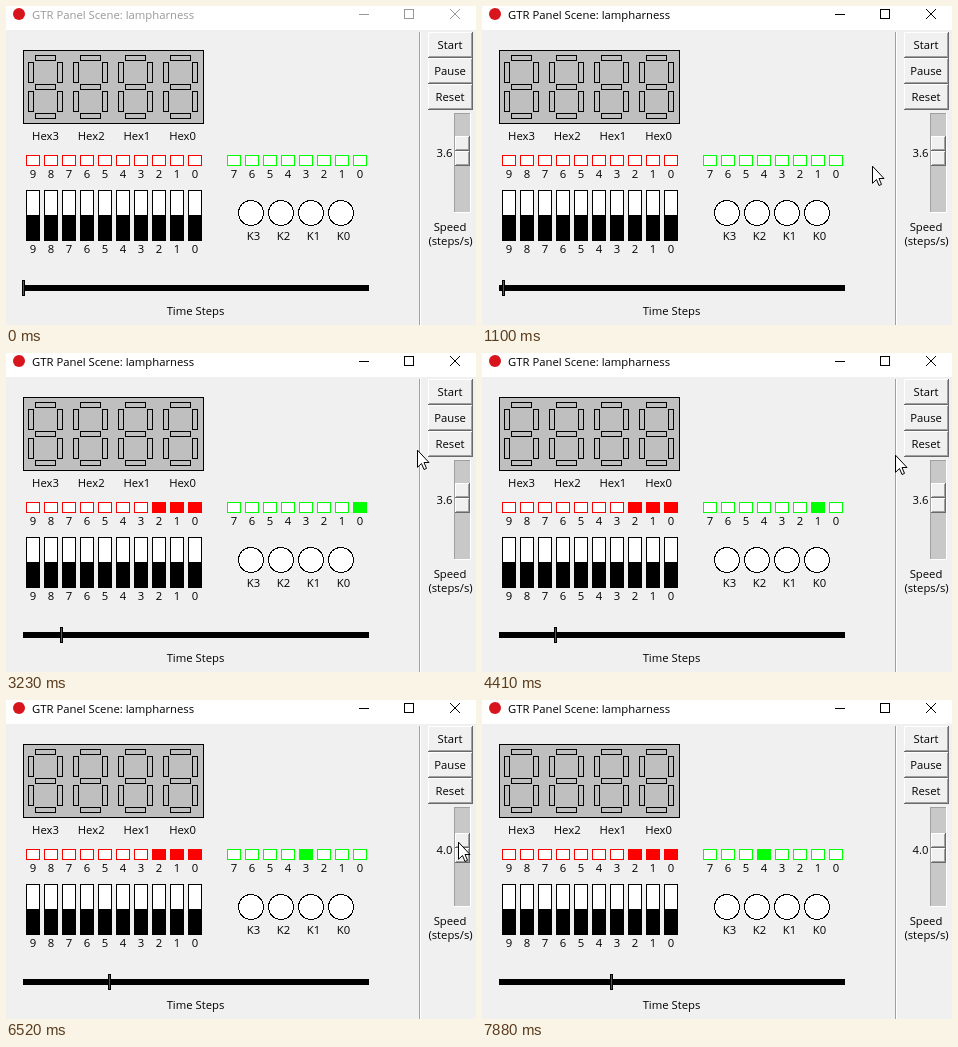
An HTML page for the animation above (8 s loop, 470x319 px).

```html
<!DOCTYPE html>
<html lang="en">
<head>
<meta charset="utf-8">
<title>GTR Panel Scene</title>
<style>
  html, body { margin: 0; width: 100%; height: 100%; overflow: hidden; background: #f0f0f0; }
  svg { display: block; width: 470px; height: 319px; }
  rect, path, .key { shape-rendering: crispEdges; }
  text { font: 11.3px "Open Sans", "Noto Sans", sans-serif; text-anchor: middle; }
  .smooth { shape-rendering: auto; }
</style>
</head>
<body>
<svg id="stage" viewBox="0 0 470 319"></svg>
<script>
const stage = document.getElementById('stage');

function add(tag, attrs, parent = stage) {
  const node = document.createElementNS('http://www.w3.org/2000/svg', tag);
  for (const key in attrs) node.setAttribute(key, attrs[key]);
  return parent.appendChild(node);
}
const fillBox = (x, y, width, height, fill, parent) =>
  add('rect', { x, y, width, height, fill }, parent);
// Outlined box covering exactly w by h pixels.
const outline = (x, y, w, h, fill, stroke = '#000') =>
  add('rect', { x: x + .5, y: y + .5, width: w - 1, height: h - 1, fill, stroke });
function label(str, x, y) {
  const node = add('text', { x, y });
  node.textContent = str;
  return node;
}
function bevel(x, y, w, h, parent) {
  const g = add('g', {}, parent);
  fillBox(x, y, w, h, '#696969', g);
  fillBox(x, y, w - 1, h - 1, '#fff', g);
  fillBox(x + 1, y + 1, w - 2, h - 2, '#a0a0a0', g);
  fillBox(x + 1, y + 1, w - 3, h - 3, '#f0f0f0', g);
  return g;
}

// Title bar
fillBox(0, 0, 470, 24, '#fff');
add('circle', { cx: 13, cy: 8, r: 6, fill: '#d8141c' });
const title = label('GTR Panel Scene: lampharness', 26, 13);
title.style.textAnchor = 'start';
const controls = add('g', { fill: 'none' });
add('path', { d: 'M353 8.5h10M398.5 3.5h9v9h-9z' }, controls);
add('path', { d: 'M444 3l10 10m0-10l-10 10', class: 'smooth' }, controls);

// Seven-segment displays
outline(17, 44, 181, 74, '#bfbfbf');
for (let i = 0; i < 4; i++) {
  const x = 22 + 45 * i;
  for (let row = 0; row < 3; row++) outline(x + 7, 49 + 29 * row, 21, 6, 'none');
  for (let n = 0; n < 4; n++) outline(x + 29 * (n % 2), n < 2 ? 56 : 85, 6, 21, 'none');
  label('Hex' + (3 - i), 39.5 + 45.7 * i, 134);
}

// Lamps, indexed by their number
function lampRow(count, rightX, color) {
  return Array.from({ length: count }, (_, n) => {
    const x = rightX - 18 * n;
    label(n, x + 7, 172);
    return outline(x, 149, 14, 11, '#fff', color);
  });
}
const redLamps = lampRow(10, 182, '#f00');
const greenLamps = lampRow(8, 347, '#0f0');

// Switches and keys
for (let n = 0; n < 10; n++) {
  const x = 182 - 18 * n;
  outline(x, 184, 14, 51, '#fff');
  fillBox(x, 209, 14, 26, '#000');
  label(n, x + 7, 247);
}
for (let n = 0; n < 4; n++) {
  const x = 335 - 30 * n;
  add('circle', { cx: x, cy: 207, r: 12.5, fill: '#fff', stroke: '#000', class: 'key' });
  label('K' + n, x + 2.5, 234);
}

// Timeline
fillBox(17, 279, 346, 6, '#000');
const marker = outline(0, 274, 3, 16, '#555');
label('Time Steps', 189.5, 309);

// Side panel
fillBox(413, 26, 1, 293, '#a0a0a0');
fillBox(414, 26, 1, 293, '#fff');
const [startButton] = ['Start', 'Pause', 'Reset'].map((name, i) => {
  const y = 26 + 26 * i;
  return { face: bevel(422, y, 45, 26), text: label(name, 444, y + 17) };
});
fillBox(448, 107, 17, 100, '#fff');
fillBox(448, 107, 16, 99, '#a0a0a0');
fillBox(449, 108, 15, 98, '#c8c8c8');
const thumb = add('g', {});
bevel(449, 0, 15, 15, thumb);
bevel(449, 15, 15, 15, thumb);
const speedText = label('', 438.5, 0);
label('Speed', 444, 225);
label('(steps/s)', 444.5, 239);

const cursor = add('path', {
  class: 'smooth', fill: '#fff', stroke: '#000',
  d: 'M.5 1.2V18.3L4.5 14.5 7 20.5 9.5 19.4 7 13.5H12Z'
});

const LOOP = 8000;
const PRESS = 560, RELEASE = 656;
const ENTRY = { x: 452, y: 322 };
const moves = [
  { from: 30, to: 400, x: 441, y: 44 },
  { from: 660, to: 850, x: 447, y: 62 },
  { from: 850, to: 1100, x: 390, y: 159 },
  { from: 2230, to: 2530, x: 411, y: 96 },
  { from: 3750, to: 4530, x: 413, y: 101 },
  { from: 4890, to: 5240, x: 443, y: 136 },
  { from: 5450, to: 6090, x: 452, y: 141 },
  { from: 6520, to: 6890, x: 446, y: 64 },
  { from: 7320, to: 7630, x: 466, y: 322 }
];

function ease(t, from, to) {
  const f = Math.min(1, Math.max(0, (t - from) / (to - from)));
  return f * f * (3 - 2 * f);
}

function cursorAt(t) {
  return moves.reduce((p, m) => {
    const f = ease(t, m.from, m.to);
    return { x: p.x + (m.x - p.x) * f, y: p.y + (m.y - p.y) * f };
  }, ENTRY);
}

// The stepping speeds up once the slider has been dragged.
function stepAt(t) {
  const first = 925, slow = 288, fast = 260, slowSteps = 16;
  const change = first + slow * slowSteps;
  return t < change
    ? Math.max(0, 1 + Math.floor((t - first) / slow))
    : 1 + slowSteps + Math.floor((t - change) / fast);
}

function render(t) {
  const step = stepAt(t);
  marker.setAttribute('x', Math.floor(16 + step * 345 / 80) + .5);
  redLamps.forEach((lamp, n) =>
    lamp.setAttribute('fill', n < 3 && step >= 5 + 2 * n ? '#f00' : '#fff'));
  const lit = Math.floor((step - 7) / 4);
  greenLamps.forEach((lamp, n) => lamp.setAttribute('fill', n === lit ? '#0f0' : '#fff'));

  const tone = t < PRESS ? '#999' : '#000';
  title.setAttribute('fill', tone);
  controls.setAttribute('stroke', tone);
  const pressed = t >= PRESS && t < RELEASE;
  startButton.face.setAttribute('transform', pressed ? 'rotate(180 444.5 39)' : '');
  startButton.text.setAttribute('transform', pressed ? 'translate(1 1)' : '');

  const drag = ease(t, 5760, 6090);
  const shift = Math.round(3 * drag);
  thumb.setAttribute('transform', `translate(0 ${130 + shift})`);
  speedText.setAttribute('y', 151 + shift);
  speedText.textContent = (3.6 + .4 * drag).toFixed(1);

  const { x, y } = cursorAt(t);
  cursor.setAttribute('transform', `translate(${Math.round(x)} ${Math.round(y)})`);
}

const began = performance.now();
function tick() {
  render((performance.now() - began) % LOOP);
  requestAnimationFrame(tick);
}
tick();
</script>
</body>
</html>
```
